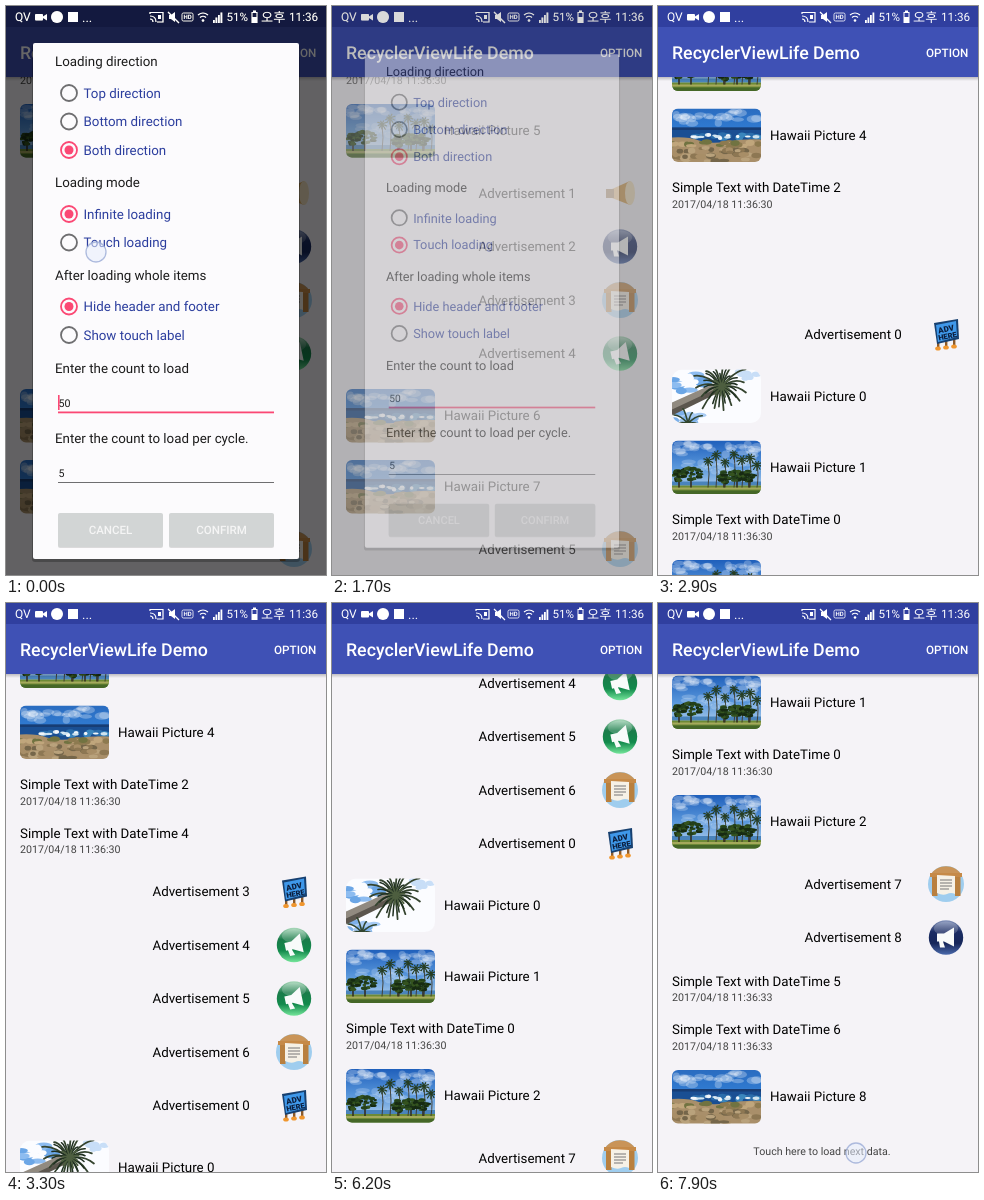
These frames come from a looping animation (320x569 px, 8000 ms). An HTML page:

```html
<!DOCTYPE html>
<html lang="en">
<head>
<meta charset="utf-8">
<title>List demo</title>
<style>
html, body { margin: 0; width: 100%; height: 100%; overflow: hidden; background: #f5f3f7; }
svg { display: block; width: 320px; height: 569px; font-family: Roboto, "Noto Sans CJK KR", "Noto Sans CJK", sans-serif; }
text { white-space: pre; text-rendering: geometricPrecision; }
</style>
</head>
<body>
<svg id="stage" viewBox="0 0 320 569"></svg>
<script>
const LOOP = 8000;
const PINK = '#fb4874', GRAY = '#6e6e70';
const HEIGHT = { pic: 71, ad: 53.5, text: 48.5 };

// y is the middle of the capitals; baselines sit on whole pixels
const text = (x, y, s, size = 13.33, fill = '#000', more = '') =>
  `<text x="${x}" y="${Math.round(y + size * .355)}" font-size="${size}" fill="${fill}" ${more}>${s}</text>`;
const rect = (x, y, w, h, fill, more = '') =>
  `<rect x="${x}" y="${y}" width="${w}" height="${h}" fill="${fill}" ${more}/>`;
const circle = (x, y, r, fill, more = '') => `<circle cx="${x}" cy="${y}" r="${r}" fill="${fill}" ${more}/>`;
const oval = (x, y, rx, ry, fill, more = '') =>
  `<ellipse cx="${x}" cy="${y}" rx="${rx}" ry="${ry}" fill="${fill}" ${more}/>`;
const path = (d, fill, more = '') => `<path d="${d}" fill="${fill}" ${more}/>`;
const line = (d, stroke, w = 1, more = '') => path(d, 'none', `stroke="${stroke}" stroke-width="${w}" ${more}`);
const group = (id, body, more = '') => `<g id="${id}" ${more}>${body}</g>`;
const gradient = (id, ...colors) => `<linearGradient id="${id}" x2="0" y2="1">` + colors.map((c, i) =>
  `<stop offset="${i / (colors.length - 1)}" stop-color="${c}"/>`).join('') + '</linearGradient>';

let seed = 7;
const random = (a, b) => a + (b - a) * ((seed = seed * 16807 % 2147483647) / 2147483647);

// Many small ovals strewn in a larger one
function clump(x, y, rx, ry, n, size, colors, more = '') {
  let s = '';
  for (let i = 0; i < n; i++) {
    const a = random(0, 2 * Math.PI), r = Math.sqrt(random(0, 1));
    s += oval((x + rx * r * Math.cos(a)).toFixed(1), (y + ry * r * Math.sin(a)).toFixed(1),
      size * random(.7, 1.5), size * random(.4, .8), colors[i % colors.length], more);
  }
  return s;
}

// Drooping fronds around a crown
function fronds(x, y, r, n, w, color) {
  let d = '';
  for (let i = 0; i < n; i++) {
    const a = i / n * 2 * Math.PI + .2, k = r * random(.7, 1.1), c = k * Math.cos(a), s = k * Math.sin(a);
    d += `M${x} ${y}q${c * .55} ${s * .55 - r * .25} ${c} ${s}`;
  }
  return line(d, color, w, 'stroke-linecap="round"');
}

function palmPhoto() {
  let s = rect(0, 0, 89, 54, 'url(#sky)') +
    clump(18, 9, 22, 7, 16, 5, ['#fff'], 'opacity=".25"') + clump(70, 12, 22, 9, 16, 5, ['#fff'], 'opacity=".25"') +
    clump(45, 27, 45, 8, 22, 5, ['#fff'], 'opacity=".2"') +
    rect(0, 41, 89, 4, '#4a84bb') + rect(0, 45, 89, 9, '#6d8a35') + rect(0, 47, 89, 2, '#a5a95c') +
    rect(0, 50, 89, 4, '#456727');
  for (const [x, y] of [[36, 21], [44, 15], [53, 22], [62, 14], [70, 20], [78, 18], [85, 25]])
    s += line(`M${x} ${y}Q${x + 2} 33 ${x} 47`, '#3c372a', .9) + fronds(x, y, 5, 9, 1.2, '#263d22');
  for (const [x, y, rx] of [[19, 33, 11], [7, 35, 6], [65, 35, 8], [52, 37, 5], [77, 36, 6]])
    s += line(`M${x} ${y}V47`, '#30291c', 1.5) + clump(x, y, rx, 6, 28, 2.4, ['#172b12', '#23401b', '#34531f']);
  return s;
}

function beachPhoto() {
  return rect(0, 0, 89, 54, 'url(#deepSky)') +
    clump(45, 9, 46, 7, 26, 5, ['#fff'], 'opacity=".28"') +
    rect(0, 19, 89, 17, '#1a4f93') + rect(0, 19, 89, 2.5, '#173d74') +
    clump(50, 28, 38, 2, 14, 4, ['#3a86bd', '#2a6dab']) +
    clump(45, 28, 40, 2, 16, 2.4, ['#f1f6fa', '#cfe3ef']) +
    path('M0 29Q16 28 27 32T56 33 89 31V54H0Z', '#a98f6a') +
    clump(45, 36, 45, 3, 22, 4, ['#c0a67c', '#8d7a50', '#717341']) +
    clump(45, 46, 46, 7, 46, 4, ['#8d7753', '#a88e67', '#b9a27c', '#75664a']);
}

function trunkPhoto() {
  return rect(0, 0, 89, 54, '#fbfcff') +
    clump(14, 13, 18, 10, 18, 6, ['#6ba6e6', '#8dbcf0', '#fbfcff']) +
    clump(14, 48, 18, 6, 12, 5, ['#7db0e9', '#a7cbf4']) + clump(74, 6, 12, 5, 8, 4, ['#c8def7']) +
    path('M0 33L42 14 50 20 0 45Z', '#918a80') + path('M0 40L47 18 51 21 0 46Z', '#5c564e') +
    fronds(49, 18, 28, 15, 1.8, '#35442f') + fronds(49, 18, 20, 17, 1.5, '#1f2f20') +
    fronds(50, 18, 10, 12, 1.8, '#4d5e3f') + fronds(16, 54, 15, 9, 1.6, '#31452e');
}

const ball = (fill, turn) => circle(0, 0, 17.2, `url(#${fill})`) + oval(0, -9, 12, 7, '#fff', 'opacity=".2"') +
  path('M-9 -4H-2L8 -10V9L-2 4H-3L-1 10H-6L-7 4H-9Z', '#f8fbfa', `transform="rotate(${turn})"`);
const icons = {
  board: [-8, 0, 8].map((x, i) => rect(x - 1, 5 - i, 2.4, 10, '#8b5a2b') + oval(x, 14.5 - i, 2.8, 2, '#f0962e')).join('') +
    path('M-12 -11L12 -15 13 5 -9 10Z', '#174070') + path('M-10 -9L10 -13 11 3 -8 8Z', '#3f98ea') +
    `<g transform="rotate(-12)" font-weight="900" text-anchor="middle">${
      text(1, -5, 'ADV', 8, '#0b1d3c') + text(1, 2, 'HERE', 7.5, '#0b1d3c')}</g>`,
  green: ball('green', -12),
  blue: ball('blue', 0),
  paper: circle(0, 0, 18, '#9fcdee') + path('M-15.5 -9A18 18 0 0 1 15.5 -9Z', '#c99458') +
    rect(-14, -11, 5.5, 23, '#b9803f') + rect(9, -11, 5.5, 23, '#b9803f') + rect(-16, -11, 32, 4, '#c68a48') +
    path('M-9 -9L9 -8V10Q5 8 1 10T-9 9Z', '#f6f1e6') + line('M-6 -4H6M-6 -1H6M-6 2H6M-6 5H3', '#777', 1.2),
  gold: path('M-8 -4L10 -12Q17 0 10 12L-8 5Z', '#d9a75b') + oval(10, 0, 5, 12, '#f1dfbd') + rect(-14, -4, 8, 9, '#8f6a3d')
};

const row = {
  pic: (y, name, photo) => `<use href="#${photo}" class="${photo}" x="14" y="${y + 9}"/>` + text(112, y + 35.5, name),
  ad: (y, name, icon) => text(146.5, y + 26.8, name) + `<g transform="translate(288 ${y + 27})">${icons[icon]}</g>`,
  text: (y, name, date) => text(14, y + 17, name) + text(14, y + 33.5, date, 10.67, '#444')
};
const rows = (y, list) => list.map(([kind, name, extra]) => {
  const s = row[kind](y, name, extra);
  y += HEIGHT[kind];
  return s;
}).join('');
const pic = (n, photo) => ['pic', 'Hawaii Picture ' + n, photo];
const ad = (n, icon) => ['ad', 'Advertisement ' + n, icon];
const note = (n, sec = 30) => ['text', 'Simple Text with DateTime ' + n, '2017/04/18 11:36:' + sec];

const defs = '<defs>' + gradient('sky', '#1f5fbb', '#5a98dc', '#c3dbf0') + gradient('deepSky', '#2a6cc0', '#2f79cf', '#a9cdec', '#fff') +
  gradient('green', '#a9d8ba', '#1a7c4a', '#128a4c', '#74e59a') + gradient('blue', '#8393bb', '#1a2c63', '#16275a', '#4a69ab') +
  gradient('shade', '#00000038', '#00000000') +
  '<clipPath id="round"><rect width="89" height="53.5" rx="6"/></clipPath>' +
  '<clipPath id="rounder"><rect width="89" height="53.5" rx="10"/></clipPath>' +
  group('palm', palmPhoto(), 'clip-path="url(#round)"') +
  group('beach', beachPhoto(), 'clip-path="url(#round)"') +
  group('trunk', trunkPhoto(), 'clip-path="url(#rounder)"') + '</defs>';

const oldList = group('oldList', rows(40.5, [note(3), pic(5, 'palm'), ad(1, 'gold'), ad(2, 'blue'),
  ad(3, 'paper'), ad(4, 'green'), pic(6, 'beach'), pic(7, 'beach'), ad(5, 'paper')]));

const newList = group('newList',
  rows(22.5, [pic(3, 'palm'), pic(4, 'beach'), note(2)]) +
  group('added', rows(213, [note(4), ad(3, 'board'), ad(4, 'green'), ad(5, 'green'), ad(6, 'paper')])) +
  group('base', rows(213, [ad(0, 'board'), pic(0, 'trunk'), pic(1, 'palm'), note(0), pic(2, 'palm')]) +
    group('tail', rows(528, [ad(7, 'paper'), ad(8, 'blue'), note(5, 33), note(6, 33), pic(8, 'beach')])) +
    group('footer', text(164, 548.5, 'Touch here to load next data.', 10.67, '#444', 'text-anchor="middle"'))));

const bars = rect(0, 71, 320, 4, 'url(#shade)') + rect(0, 0, 320, 21, '#303f9f') + rect(0, 21, 320, 50, '#3f51b5') +
  text(14, 47, 'RecyclerViewLife Demo', 17.78, '#fff', 'font-weight="500"') +
  text(268, 47, 'OPTION', 11.7, '#fff', 'font-weight="500"');

const status = text(9, 11, 'QV', 12, '#fff') +
  rect(29, 8, 8, 6.5, '#fff', 'rx="1"') + path('M37 10.5L41 8V14.5L37 12Z', '#fff') +
  circle(51, 11, 6, '#fff') + rect(62, 6, 10, 10, '#fff') +
  text(76, 11, '...', 13, '#fff') +
  line('M144 8V6.5H157V16H151M144 10Q150 10 150 16M144 13Q147 13 147 16', '#fff', 1.2) + rect(152, 9, 3, 4, '#fff') +
  path('M163 9H165L169 6V16L165 13H163Z', '#fff') + line('M162 6L173 17', '#fff', 1.2) +
  rect(176, 7, 11, 8, 'none', 'stroke="#fff" stroke-width=".8" rx="1.5"') + text(177.5, 11, 'HD', 6, '#fff', 'font-weight="700"') +
  line('M192 9Q197 5 202 9M194 11.5Q197 9 200 11.5', '#fff', 1.2) + circle(197, 14.5, 1.3, '#fff') +
  [0, 1, 2, 3].map(i => rect(207 + i * 2.5, 14 - i * 2.5, 1.8, 3 + i * 2.5, '#fff')).join('') +
  text(220.5, 11, '51%', 11.6, '#fff') +
  rect(246, 6.5, 5, 10, 'none', 'stroke="#fff"') + rect(247, 4.5, 3, 2, '#fff') + rect(246, 11, 5, 5, '#fff') +
  text(255, 11, '오후', 13.2, '#fff') + text(283, 11, '11:36', 11.7, '#fff');

const radio = (y, name, on, id = '') =>
  circle(63, y, 8, 'none', `stroke="${on ? PINK : GRAY}" stroke-width="1.8" id="${id}Ring"`) +
  circle(63, y, on ? 4.5 : 0, PINK, `id="${id}Dot"`) + text(77.5, y, name, 13.33, '#2c3e9e');
const button = (x, name) => rect(x, 508, 105, 34, '#00000022', 'rx="2"') + rect(x, 507, 105, 34, '#d2d5d5', 'rx="2"') +
  text(x + 52.5, 524, name, 11.56, '#f5f5f5', 'font-weight="500" text-anchor="middle"');

const dialog = group('dialog',
  rect(26, 38, 268, 518, '#00000040', 'rx="3"') + rect(27, 37, 266, 516, '#fcfbfd', 'rx="2"') +
  [['Loading direction', 55], ['Loading mode', 176], ['After loading whole items', 269],
    ['Enter the count to load', 362], ['Enter the count to load per cycle.', 432]]
    .map(([s, y]) => text(49, y, s, 13.33, '#1c1c1c')).join('') +
  radio(87, 'Top direction') + radio(115.5, 'Bottom direction') + radio(144, 'Both direction', true) +
  radio(208, 'Infinite loading', true, 'infinite') + radio(236.5, 'Touch loading', false, 'touch') +
  radio(300.5, 'Hide header and footer', true) + radio(329, 'Show touch label') +
  text(52.5, 397, '50', 10.67, '#1c1c1c') + text(52.5, 467, '5', 10.67, '#1c1c1c') +
  rect(52, 389, 1.6, 15, PINK, 'id="caret"') +
  rect(52, 405.5, 216, 1.8, PINK) + rect(52, 476, 216, 1, GRAY) +
  button(52, 'CANCEL') + button(163, 'CONFIRM'));

const $ = id => document.getElementById(id);
$('stage').innerHTML = defs + rect(0, 0, 320, 569, '#f5f3f7') + oldList + newList +
  path('M0 565Q160 533 320 565V569H0Z', '#5a78b4', 'id="glow"') + bars +
  group('shownStatus', status) + rect(0, 0, 320, 569, '#000', 'id="dim"') +
  group('dimStatus', status) + dialog +
  circle(0, 0, 10, '#e6ecfc', 'id="finger" fill-opacity=".55" stroke="#9babd6" stroke-opacity=".8" stroke-width="1.3"');

const latePhotos = document.querySelectorAll('.palm');
const ramp = (t, a, b) => Math.min(1, Math.max(0, (t - a) / (b - a)));
const smooth = p => p * p * (3 - 2 * p);
const out = p => 1 - (1 - p) ** 2;
const fade = (id, v) => $(id).setAttribute('opacity', v);
const shift = (id, y) => $(id).setAttribute('transform', `translate(0 ${Math.round(y)})`);

// [start, end, x, y]
const touches = [[-200, 300, 90, 246], [1300, 1650, 235, 525], [5300, 5700, 198, 550], [7900, 8200, 198, 550]];

function draw(t) {
  // Settings dialog
  const pick = ramp(t, 200, 450), close = ramp(t, 1580, 1800), size = 1 - .08 * close;
  $('infiniteDot').setAttribute('r', 4.5 * (1 - pick));
  $('touchDot').setAttribute('r', 4.5 * pick);
  $('infiniteRing').setAttribute('stroke', pick > .5 ? GRAY : PINK);
  $('touchRing').setAttribute('stroke', pick > .5 ? PINK : GRAY);
  fade('caret', t < 500 ? 1 : 0);
  fade('dialog', 1 - close);
  $('dialog').setAttribute('transform', `translate(160 295) scale(${size}) translate(-160 -295)`);
  fade('dim', .6 * (1 - close));
  fade('dimStatus', 1 - close);
  fade('oldList', 1 - ramp(t, 1650, 1800));

  // List loading and scrolling
  fade('newList', t < 2100 ? 0 : 1);
  latePhotos.forEach(p => p.setAttribute('opacity', t < 2100 ? 1 : ramp(t, 2200, 2500)));
  shift('base', 262 * smooth(ramp(t, 2800, 3060)));
  fade('added', ramp(t, 3050, 3300));
  shift('newList', -262 * out(ramp(t, 4150, 4480)) - 274 * out(ramp(t, 6550, 7300)));
  fade('glow', .17 * ramp(t, 4400, 4480) * (1 - ramp(t, 4550, 4850)));
  shift('footer', 274 * smooth(ramp(t, 5700, 5950)));
  fade('tail', ramp(t, 5900, 6200));

  const hit = touches.find(([a, b]) => t >= a && t < b);
  fade('finger', hit ? Math.min(1, (hit[1] - t) / 120) : 0);
  if (hit) $('finger').setAttribute('transform', `translate(${hit[2]} ${hit[3]})`);
}

const start = performance.now();
function tick() {
  draw((performance.now() - start) % LOOP);
  requestAnimationFrame(tick);
}
tick();
</script>
</body>
</html>
```
